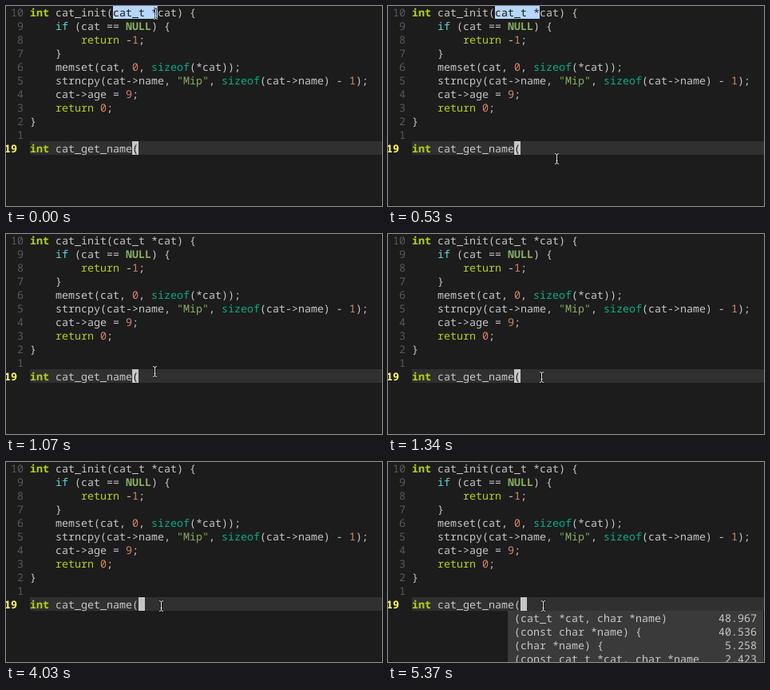
Write an HTML page that moves like this. It is 471x250 px and loops after 8000 ms.

```html
<!DOCTYPE html>
<html lang="en">
<head>
<meta charset="utf-8">
<title>Code editor completion</title>
<style>
  html, body { margin: 0; width: 100%; height: 100%; overflow: hidden; background: #1c1c1c; }
  svg { display: block; width: 471px; height: 250px; }
  text {
    font: 13.333px "Noto Sans Mono", "DejaVu Sans Mono", monospace;
    fill: #c6c6c6;
    white-space: pre;
    text-rendering: geometricPrecision;
  }
  .code { font-weight: 500; }
  .type { fill: #afd700; font-weight: 700; }
  .flow { fill: #afd700; }
  .cond { fill: #5fd7d7; }
  .const { fill: #87af5f; font-weight: 700; }
  .op { fill: #00af87; }
  .str { fill: #87af5f; }
  .digit { fill: #d7875f; }
  .num { fill: #585858; }
  .now { fill: #ffff5f; font-weight: 700; }
  .dark { fill: #1c1c1c; font-weight: 500; }
</style>
</head>
<body>
<svg id="stage" viewBox="0 0 471 250"></svg>
<script>
const LOOP = 8000, COL = 8, ROW = 17, LEFT = 30, TOP = -1, BASE = 14;
const stage = document.getElementById('stage');

const lines = [
  'int cat_init(cat_t *cat) {',
  '    if (cat == NULL) {',
  '        return -1;',
  '    }',
  '    memset(cat, 0, sizeof(*cat));',
  '    strncpy(cat->name, "Mip", sizeof(cat->name) - 1);',
  '    cat->age = 9;',
  '    return 0;',
  '}',
  '',
  'int cat_get_name('
];
const current = lines.length - 1;
const choices = [
  ['(cat_t *cat, char *name)', '48.967'],
  ['(const char *name) {', '40.536'],
  ['(char *name) {', '5.258'],
  ['(const cat_t *cat, char *name', '2.423']
];
const wordClass = { int: 'type', return: 'flow', if: 'cond', NULL: 'const', sizeof: 'op' };

// Pointer places: [start time, left, top]
const pointerSteps = [
  [0, 184, 2], [260, 183, 2], [530, 208, 183], [800, 183, 167],
  [1070, 183, 164], [1340, 189, 171], [1600, 191, 172]
];

function add(parent, tag, attrs) {
  const node = document.createElementNS('http://www.w3.org/2000/svg', tag);
  for (const name in attrs) node.setAttribute(name, attrs[name]);
  return parent.appendChild(node);
}

const colX = col => LEFT + col * COL;
const rowY = row => TOP + row * ROW;

function block(parent, col, row, cols, rows, fill) {
  return add(parent, 'rect', {
    x: colX(col), y: rowY(row), width: cols * COL, height: rows * ROW, fill
  });
}

function write(parent, col, row, content, cls = '') {
  const node = add(parent, 'text', { x: colX(col), y: rowY(row) + BASE, class: cls });
  node.textContent = content;
  return node;
}

function tokenClass(part) {
  if (part[0] === '"') return 'str';
  if (/^\d+$/.test(part)) return 'digit';
  return wordClass[part] || '';
}

function writeCode(row, code) {
  const node = write(stage, 0, row, '', 'code');
  for (const part of code.split(/(\b(?:int|return|NULL|if|sizeof|\d+)\b|"[^"]*")/)) {
    if (part) add(node, 'tspan', { class: tokenClass(part) }).textContent = part;
  }
}

block(stage, 0, current, 56, 1, '#303030');
lines.forEach((code, row) => {
  if (row < current) {
    const label = String(current - row);
    write(stage, -1 - label.length, row, label, 'num');
  }
  writeCode(row, code);
});
write(stage, -4, current, '19', 'now');

const selection = add(stage, 'g', {});
block(selection, 13, 0, 7, 1, '#b5d7ff');
write(selection, 13, 0, 'cat_t *', 'dark');

const cursor = block(stage, 16, current, 1, 1, '#c6c6c6');
const covered = write(stage, 16, current, '(', 'dark');

const popup = add(stage, 'g', {});
block(popup, 15, current + 1, 40, 4, '#3a3a3a');
choices.forEach(([label, score], i) => {
  write(popup, 16, current + 1 + i, label);
  write(popup, 54 - score.length, current + 1 + i, score);
});

const pointer = add(stage, 'g', { fill: 'none' });
const beam = 'M1 1.5Q3.5 1.5 3.5 3.5Q3.5 1.5 6 1.5M3.5 3V13' +
  'M1 14.5Q3.5 14.5 3.5 12.5Q3.5 14.5 6 14.5M2.5 10.5H4.5';
add(pointer, 'path', { d: beam, stroke: '#111111', 'stroke-width': 2.4 });
add(pointer, 'path', { d: beam, stroke: '#e4e4e4', 'stroke-width': 1 });

function show(node, on) {
  node.setAttribute('visibility', on ? 'visible' : 'hidden');
}

function draw(t) {
  const [, x, y] = pointerSteps.filter(step => step[0] <= t).pop();
  pointer.setAttribute('transform', `translate(${x} ${y})`);
  show(selection, t < 1070);
  const inserting = t >= 4030;
  cursor.setAttribute('x', colX(inserting ? 17 : 16));
  show(covered, !inserting);
  show(popup, t >= 5370);
}

const start = performance.now();
function tick() {
  draw((performance.now() - start) % LOOP);
  requestAnimationFrame(tick);
}
tick();
</script>
</body>
</html>
```
